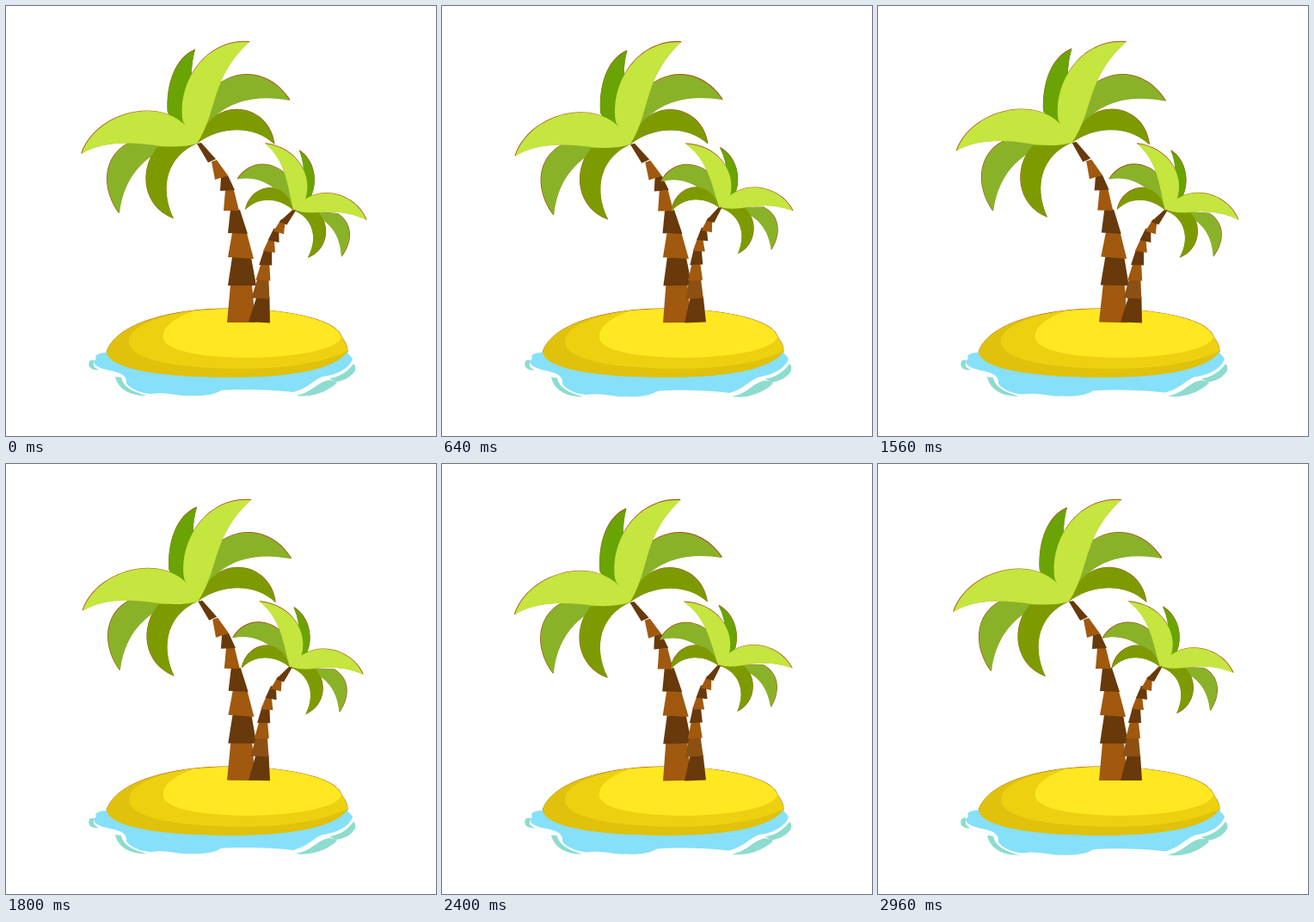
These frames come from a looping animation (500 px wide and 500 px high, 3 s). An HTML page with a canvas:

```html
<!DOCTYPE html>
<html lang="en">
<head>
<meta charset="utf-8">
<title>Palm island</title>
<style>
html, body { margin: 0; width: 100%; height: 100%; overflow: hidden; background: #fff; }
canvas { display: block; width: 100vw; height: 100vh; }
</style>
</head>
<body>
<canvas id="stage" width="500" height="500"></canvas>
<script>
const ctx = document.getElementById('stage').getContext('2d');
const LOOP = 3000;
const LIGHT = '#c5e53f', MID = '#89b229', OLIVE = '#7d9b00', DEEP = '#6aa304';
const BARK = '#a0590f', DARK = '#68390a', EDGE = '#a8511c';

const shape = (color, d) => ({ color, path: new Path2D(d) });

// Leaves from back to front
const bigLeaves = [
  shape(DEEP, 'M220 51C196 61 186 92 188 124Q196 136 210 143L222 110Q211 82 220 51Z'),
  shape(MID, 'M330 110C306 72 262 71 236 101L222 160C236 122 274 99 330 110Z'),
  shape(OLIVE, 'M312 161C306 112 239 102 222 160C248 140 288 138 312 161Z'),
  shape(MID, 'M132 241C111 213 112 175 143 159L195 161C170 171 138 190 132 241Z'),
  shape(OLIVE, 'M195 247C159 233 154 191 176 164L222 160C189 174 177 209 195 247Z'),
  shape(LIGHT, 'M88 172C106 118 199 99 222 160Q205 165 180 163C142 157 111 158 88 172Z'),
  shape(LIGHT, 'M283 42C230 38 198 92 206 135L222 160C247 122 237 84 283 42Z')
];
const smallLeaves = [
  shape(DEEP, 'M331 166C350 177 355 202 347 220L336 226L337 198Q339 184 331 166Z'),
  shape(MID, 'M261 203C274 180 300 179 318 195L328 236C312 212 288 196 261 203Z'),
  shape(OLIVE, 'M272 238C277 207 318 198 328 236C309 221 286 222 272 238Z'),
  shape(MID, 'M386 287C399 268 397 247 379 237L335 236C365 241 383 256 386 287Z'),
  shape(OLIVE, 'M347 290C370 280 372 251 357 237L328 236C350 243 359 266 347 290Z'),
  shape(LIGHT, 'M413 243C399 211 350 201 329 235Q338 239 355 237C376 234 395 235 413 243Z'),
  shape(LIGHT, 'M291 160C330 163 349 196 341 222L328 236C320 212 318 180 291 160Z')
];
const bigTrunk = [
  shape(BARK, 'M257 368L261 324H286L290 368Z'),
  shape(DARK, 'M258 325L263 292H285L291 325Z'),
  shape(BARK, 'M258 292L263 264H280L288 294Z'),
  shape(DARK, 'M258 264L261 237H272L281 265Z'),
  shape(BARK, 'M253 238L255 214H265L271 238Z'),
  shape(DARK, 'M249 215L250 199L258 197L266 214Z'),
  shape(BARK, 'M243 202L239 181L245 179L258 197Z'),
  shape(DARK, 'M235 182L222 160L227 159L244 178Z')
];
const smallTrunk = [
  shape(DARK, 'M282 368L290 338H305L307 368Z'),
  shape('#8d5013', 'M284 340L290 317H303L305 340Z'),
  shape(BARK, 'M288 319L293 300H303L305 319Z'),
  shape(DARK, 'M291 301L296 283H305L306 301Z'),
  shape(BARK, 'M295 285L301 270H307L309 286Z'),
  shape(DARK, 'M300 272L306 258H312L313 274Z'),
  shape(BARK, 'M306 261L314 247H319L318 264Z'),
  shape(DARK, 'M312 250L327 235H331L321 253Z')
];
const sand = [
  shape('#e0c10b', 'M117 403C126 370 191 352 258 352C320 352 380 363 389 382C391 388 397 391 397 402C383 423 329 432 262 432C190 432 121 424 117 403Z'),
  shape('#edd010', 'M220 354C166 362 143 376 143 390C143 405 168 412 196 417C260 425 350 425 397 401C397 391 391 388 389 382C380 363 320 352 258 352Z'),
  shape('#ffe822', 'M218 355C192 364 181 375 183 387C188 403 236 409 285 409C340 408 386 399 390 385C382 363 320 352 258 352Z')
];
const TEAL = '#8ddccf';
const water = [
  shape('#86e0fa', 'M118 403C108 403 102 406 105 410C98 416 106 421 122 424C136 427 141 431 140 439C146 446 156 450 168 451C188 448 198 454 214 453C232 454 244 451 250 447C270 445 310 446 334 449C352 444 356 436 368 431C385 429 400 421 403 410L396 402Z'),
  shape(TEAL, 'M97 413C94 420 100 424 108 423C101 420 101 417 103 412Q99 411 97 413Z'),
  shape(TEAL, 'M127 431C130 446 146 454 164 453C148 449 136 443 134 432Z'),
  shape(TEAL, 'M337 453C357 449 359 439 375 435Q381 435 385 438C376 447 357 456 337 453Z'),
  shape(TEAL, 'M376 433C390 431 399 423 404 416Q407 418 406 424C401 432 392 436 383 437Z')
];

// Poses: -1 leans left, 1 leans right
const times = [0, 500, 1000, 1500, 2000, 2450, 2900];
const bigPose = [0, -1, 0, 1, 0, -1, 0];
const smallPose = [1, -1, 0, 1, 0, -1, 0];

function sway(pose, t) {
  const i = times.findIndex(k => k > t);
  if (i < 0) return pose[pose.length - 1];
  const p = (t - times[i - 1]) / (times[i] - times[i - 1]);
  return pose[i - 1] + (pose[i] - pose[i - 1]) * p * p * (3 - 2 * p);
}

function paint(shapes, color) {
  for (const s of shapes) {
    ctx.fillStyle = color || s.color;
    ctx.fill(s.path);
  }
}

// Brown rim on the outer side: a slightly larger copy behind
function paintRimmed(shapes, x, y, scale) {
  ctx.save();
  ctx.translate(x, y);
  ctx.scale(scale, scale);
  ctx.translate(-x, -y);
  paint(shapes, EDGE);
  ctx.restore();
  paint(shapes);
}

function lean(x, y, angle, draw) {
  ctx.save();
  ctx.translate(x, y);
  ctx.rotate(angle * Math.PI / 180);
  ctx.translate(-x, -y);
  draw();
  ctx.restore();
}

function drawWater(t) {
  const swell = 1 - Math.cos(t * Math.PI / 1000);
  ctx.save();
  ctx.translate(0, 415);
  ctx.scale(1, 1 + swell / 50);
  ctx.translate(0, -415);
  paint(water);
  ctx.restore();
}

function draw(t) {
  ctx.fillStyle = '#fff';
  ctx.fillRect(0, 0, 500, 500);
  ctx.strokeStyle = EDGE;
  ctx.stroke(sand[0].path);
  drawWater(t);
  paint(sand);
  lean(282, 368, sway(bigPose, t) * 1.03, () => {
    paint(bigTrunk);
    paintRimmed(bigLeaves, 222, 200, 1.007);
  });
  lean(295, 368, sway(smallPose, t) * 2.8, () => {
    paint(smallTrunk);
    paintRimmed(smallLeaves, 328, 262, 1.01);
  });
}

const start = performance.now();
function tick() {
  draw((performance.now() - start) % LOOP);
  requestAnimationFrame(tick);
}
tick();
</script>
</body>
</html>
```
